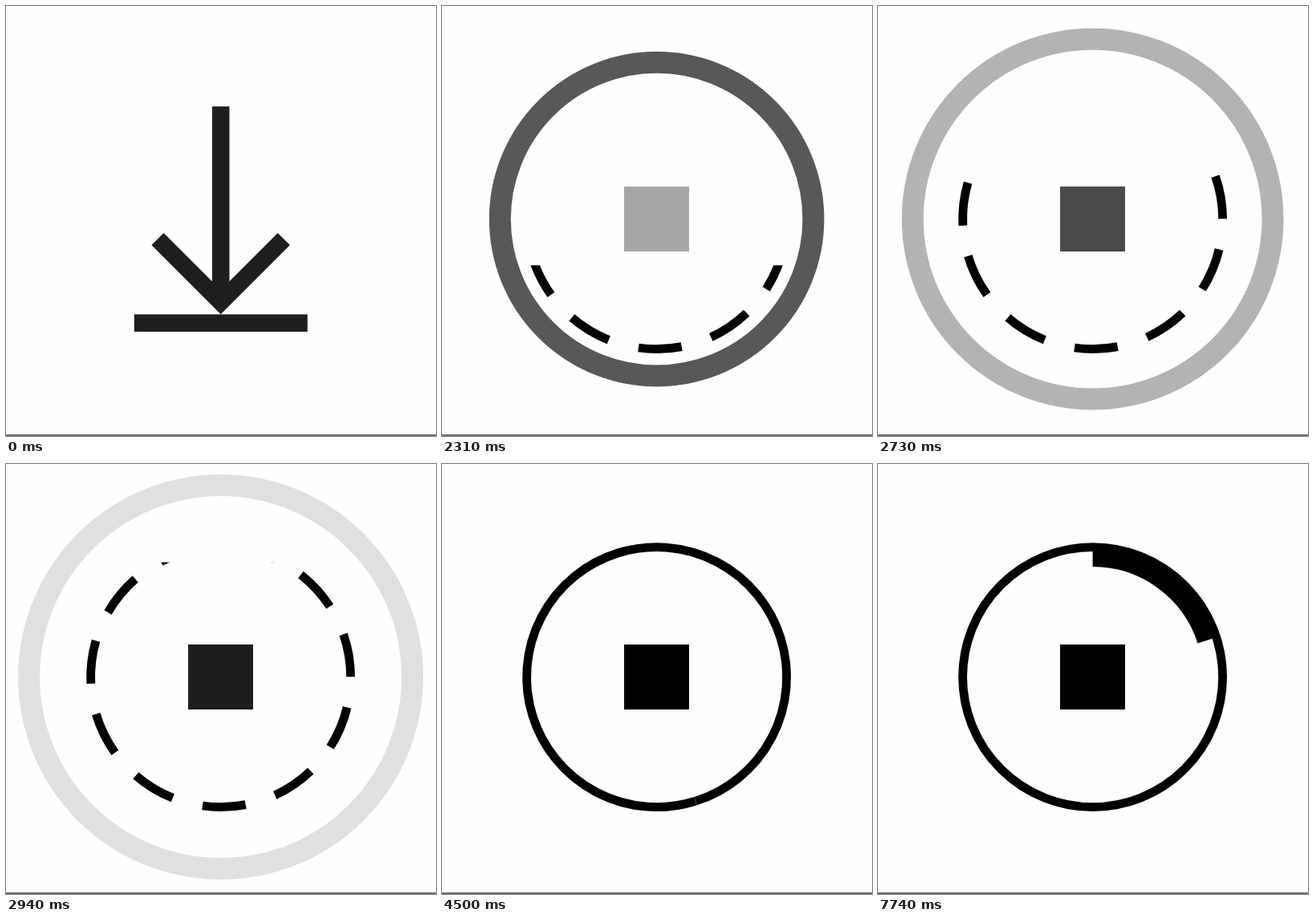
Animation, 536 px wide and 536 px high, one loop 8 s. Source, as an HTML page with a canvas:

```html
<!DOCTYPE html>
<html lang="en">
<head>
<meta charset="utf-8">
<title>Icon sequence</title>
<style>
  html, body { margin: 0; width: 100%; height: 100%; overflow: hidden; background: #fefefe; }
  canvas { display: block; width: 536px; height: 536px; }
</style>
</head>
<body>
<canvas id="stage" width="536" height="536"></canvas>
<script>
const ctx = document.getElementById('stage').getContext('2d');
const SIZE = 536, LOOP = 8000, STEP = 30;
const CX = 267.6, CY = 265.6;
const UNIT = 2.7;
const RADIUS = 60 * UNIT, LINE = 4 * UNIT;
const DASHES = 11, DASH = 19.1, DASH_START = 5.3;
const SEAM = 162.6;

const clamp = v => Math.min(1, Math.max(0, v));
const progress = (t, from, to) => clamp((t - from) / (to - from));

// Angles are in degrees, clockwise from the top.
const rad = deg => (deg - 90) * Math.PI / 180;

function arc(radius, width, from, to) {
  ctx.lineWidth = width;
  ctx.beginPath();
  ctx.arc(CX, CY, radius, rad(from), rad(to));
  ctx.stroke();
}

function circle(radius, width) {
  ctx.lineWidth = width;
  ctx.beginPath();
  ctx.arc(CX, CY, radius, 0, Math.PI * 2);
  ctx.closePath();
  ctx.stroke();
}

function square(alpha) {
  const side = 30 * UNIT;
  ctx.globalAlpha = alpha;
  ctx.fillRect(227, 225, side, side);
  ctx.globalAlpha = 1;
}

function arrow(color) {
  ctx.fillStyle = color;
  ctx.fillRect(256.9, 125.2, 21.6, 240);
  ctx.beginPath();
  ctx.moveTo(267.7, 384.2);
  ctx.lineTo(181.4, 297.9);
  ctx.lineTo(196.6, 282.9);
  ctx.lineTo(267.7, 354);
  ctx.lineTo(338.8, 282.9);
  ctx.lineTo(354, 297.9);
  ctx.closePath();
  ctx.fill();
  ctx.fillRect(159.8, 384.4, 216, 21.6);
}

function dashes() {
  const period = 360 / DASHES;
  for (let i = 0; i < DASHES; i++) {
    const from = DASH_START + i * period;
    arc(RADIUS, LINE, from, from + DASH);
  }
}

// A ring expands and fades out while the dashes are wiped in from below.
function intro(t) {
  const p = progress(t, 1900, 3080);
  if (p < 1) {
    ctx.globalAlpha = 1 - p;
    circle(166.9 + 81.8 * p, 10 * UNIT);
    ctx.globalAlpha = 1;
  }
  ctx.save();
  ctx.beginPath();
  ctx.rect(0, 454 - 376 * p, SIZE, SIZE);
  ctx.clip();
  dashes();
  ctx.restore();
  square(p);
}

function solidify(t) {
  const p = progress(t, 3300, 4500);
  if (p < 1) dashes();
  ctx.globalAlpha = p;
  arc(RADIUS, LINE, SEAM + 0.05, SEAM + 359.95);
  ctx.globalAlpha = 1;
  square(1);
}

function load(t) {
  const angle = 15.2 + 57 * progress(t, 7200, 7740);
  circle(RADIUS, LINE);
  arc(151, 27, 0, angle);
  square(1);
}

function draw(t) {
  ctx.fillStyle = '#fefefe';
  ctx.fillRect(0, 0, SIZE, SIZE);
  ctx.fillStyle = '#6e6b6c';
  ctx.fillRect(0, 534, SIZE, 2);
  ctx.fillStyle = ctx.strokeStyle = '#000';

  if (t < 1950) arrow(t < 90 ? '#1f1f1f' : '#000');
  else if (t < 2130) return;
  else if (t < 3330) intro(t);
  else if (t < 7200) solidify(t);
  else load(t);
}

const start = performance.now();
function tick() {
  const t = (performance.now() - start) % LOOP;
  draw(Math.floor(t / STEP) * STEP);
  requestAnimationFrame(tick);
}
tick();
</script>
</body>
</html>
```
